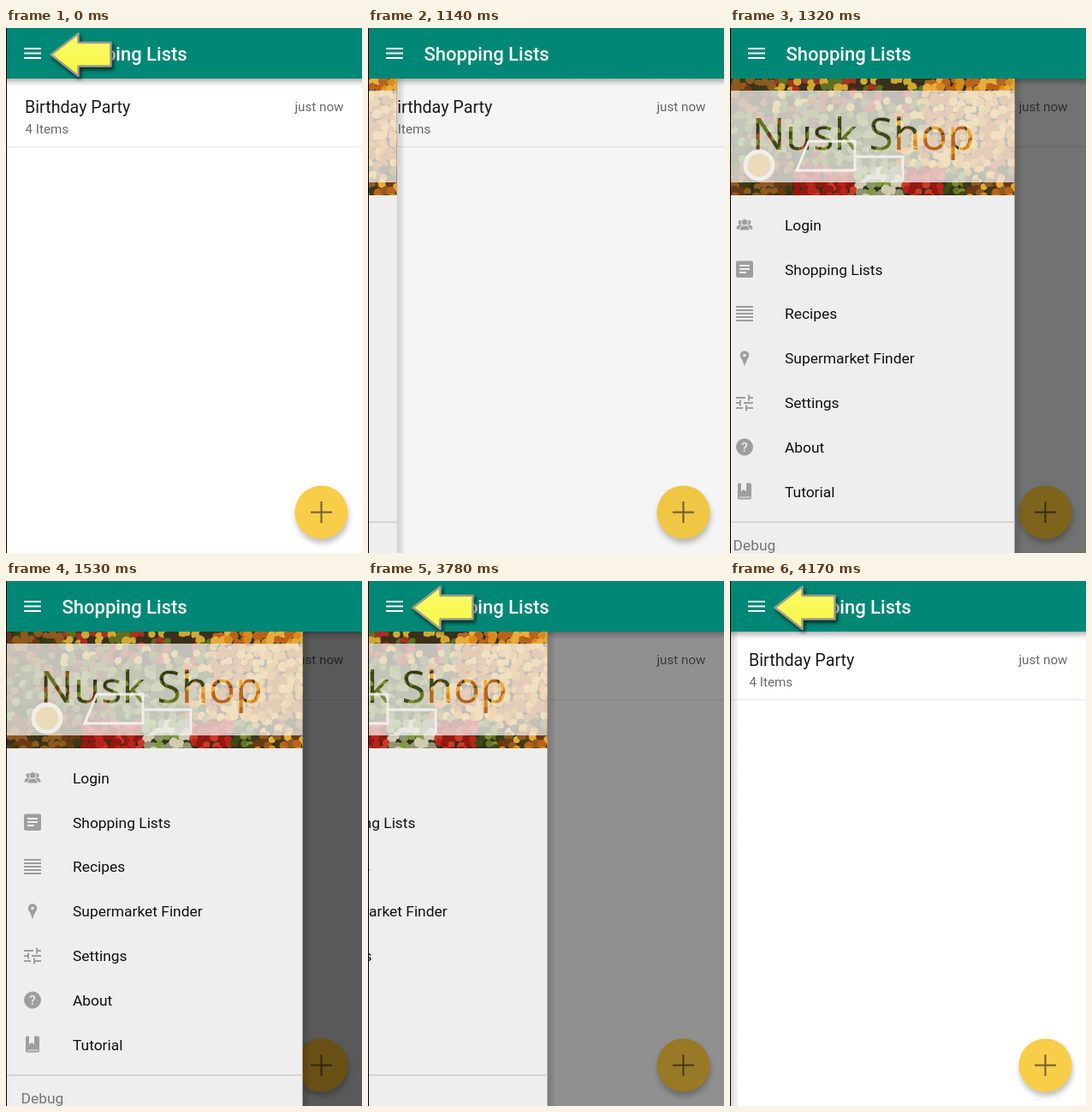
Recreate the animation shown at these times as an HTML page. Size 416x612 px, loop 4.2 s.

```html
<!DOCTYPE html>
<html lang="en">
<head>
<meta charset="utf-8">
<title>Shopping Lists</title>
<style>
html, body { margin: 0; width: 100%; height: 100%; overflow: hidden; background: #fff; }
svg { display: block; width: 416px; height: 612px; font-family: Roboto, sans-serif; }
.logo { font: 52px "Open Sans", sans-serif; }
.item { font-size: 17.4px; fill: #111; }
.small { font-size: 15.2px; fill: #6a6a6a; }
.line { fill: none; stroke: #9e9e9e; stroke-width: 2; }
#fab { filter: drop-shadow(1px 5px 3px rgba(0,0,0,.25)); }
#arrow { filter: drop-shadow(2px 3px 2px rgba(0,0,0,.7)); }
</style>
</head>
<body>
<svg viewBox="0 0 416 612">
  <defs>
    <linearGradient id="barShade" x2="0" y2="1">
      <stop stop-color="#000" stop-opacity=".28"/>
      <stop offset=".5" stop-color="#000" stop-opacity=".12"/>
      <stop offset="1" stop-color="#000" stop-opacity="0"/>
    </linearGradient>
    <linearGradient id="sideShade">
      <stop stop-color="#000" stop-opacity=".16"/>
      <stop offset="1" stop-color="#000" stop-opacity=".04"/>
    </linearGradient>
    <linearGradient id="gold" x2="0" y2="1">
      <stop stop-color="#fbfb6a"/>
      <stop offset="1" stop-color="#f6f645"/>
    </linearGradient>
    <clipPath id="photoClip"><rect x="1" y="59" width="345.5" height="136"/></clipPath>
    <mask id="cut" maskUnits="userSpaceOnUse" x="0" y="60" width="347" height="135">
      <rect y="60" width="347" height="135" fill="#fff"/>
      <text class="logo" x="300" y="142" text-anchor="end">Nusk Shop</text>
    </mask>
  </defs>

  <rect width="416" height="612" fill="#fff"/>
  <text x="22" y="98.5" font-size="19.7" fill="#1c1c1c">Birthday Party</text>
  <text class="small" x="22.5" y="123">4 Items</text>
  <text class="small" x="394.5" y="97" text-anchor="end">just now</text>
  <rect y="138" width="416" height="1" fill="#e6e6e6"/>
  <rect y="59" width="416" height="9" fill="url(#barShade)"/>
  <rect id="scrim" y="59" width="416" height="553"/>

  <g id="fab">
    <circle id="disc" cx="368.5" cy="564.5" r="31"/>
    <path id="plus" d="M356 564.5h25M368.5 552v25" stroke-width="2"/>
  </g>

  <g id="drawer">
    <rect x="346.5" y="59" width="8.5" height="553" fill="url(#sideShade)"/>
    <rect x="1" y="59" width="345.5" height="553" fill="#eee"/>
    <g id="photo" clip-path="url(#photoClip)">
      <rect y="59" width="347" height="136" fill="#33301a"/>
    </g>
    <rect x="1" y="73" width="345.5" height="107" fill="#f4f4f4" opacity=".73" mask="url(#cut)"/>
    <g id="menu"></g>
    <g fill="#9e9e9e" transform="translate(0 -.5)">
      <circle cx="26" cy="227" r="2.5"/><circle cx="36" cy="227" r="2.5"/>
      <path d="M21.5 235q0-5 4.500-5h10q4.500 0 4.500 5z"/>
      <g stroke="#eee"><circle cx="31" cy="227" r="4"/><path d="M25 236.500q0-6 6-6t6 6z"/></g>
      <rect x="21" y="272" width="20" height="19.500" rx="2"/>
      <path class="line" style="stroke:#eee" d="M25 277.500h12M25 281.500h12M25 285.500h8"/>
      <path class="line" d="M21 325.500h20M21 329.500h20M21 333.500h20M21 337.500h20M21 341.500h20"/>
      <circle cx="31" cy="382" r="5.200"/>
      <path d="M27 384.500L31 394.500L35 384.500Z"/>
      <circle cx="31" cy="382" r="1.800" fill="#eee"/>
      <path class="line" d="M21 431.500h11M36 431.500h5M36 428v7M21 437.500h5M30 437.500h11M26 434v7M21 443.500h8M33 443.500h8M33 440v7"/>
      <circle cx="31" cy="489" r="10"/>
      <text x="31" y="494.500" font-size="15.500" font-weight="500" text-anchor="middle" fill="#eee">?</text>
      <path d="M25 531h2v10l3-2.500 3 2.500v-10h4q2 0 2 2v15q0 2-2 2h-12q-2 0-2-2v-15q0-2 2-2z"/>
      <path stroke="#eee" d="M25 547.500h13"/>
    </g>
    <rect x="1" y="575" width="345.5" height="2" fill="#d6d6d6"/>
    <text class="item" x="17.500" y="608.500" style="fill:#757575">Debug</text>
  </g>

  <rect width="416" height="59" fill="#008775"/>
  <path d="M21 24h20M21 29.500h20M21 35h20" stroke="#fff" stroke-width="2"/>
  <text x="65.500" y="38" font-size="22" font-weight="500" fill="#fff">Shopping Lists</text>
  <path id="arrow" d="M52.500 31L84.500 6.500V17H122.500V44.500H84.500V56Z" fill="url(#gold)" stroke="#9c9c8c" stroke-width="2.500" stroke-linejoin="round"/>
  <rect width="1" height="612"/>
</svg>
<script>
const $ = id => document.getElementById(id);
const clamp = v => Math.min(1, Math.max(0, v));

function add(parent, tag, attrs, text = '') {
  const el = document.createElementNS('http://www.w3.org/2000/svg', tag);
  for (const k in attrs) el.setAttribute(k, attrs[k]);
  el.textContent = text;
  parent.append(el);
}

['Login', 'Shopping Lists', 'Recipes', 'Supermarket Finder', 'Settings', 'About', 'Tutorial']
  .forEach((name, i) => add($('menu'), 'text', { class: 'item', x: 78, y: 235.6 + 51.9 * i }, name));

// Market stall: rough dots of fruit, coloured by area
const reds = ['#b8241a', '#94180f', '#cc3a28'];
const greens = ['#66751e', '#3c4a14', '#7d8c34'];
const oranges = ['#d98a1c', '#e8ac3a', '#b8641a'];
const browns = ['#6b3a14', '#8f5a1d', '#3c3a14'];
const mixed = ['#d0a830', '#a83020', '#5f6e20', '#3c3018'];
const pale = ['#cfcab0', '#7d9a3c', '#8f9470'];

function palette(x, y) {
  if (y > 160) return x < 90 ? browns : x < 155 ? reds : x < 215 ? pale
    : x < 265 ? reds : x < 290 ? greens : [...browns, ...oranges];
  if (x > 240) return oranges;
  if (y < 95) return x < 60 ? browns : mixed;
  return x < 130 ? [...browns, ...greens] : x < 210 ? greens : [...greens, ...oranges];
}

let seed = 7;
const rand = () => (seed = seed * 16807 % 2147483647) / 2147483647;
for (let y = 60; y < 198; y += 8)
  for (let x = 2; x < 350; x += 8) {
    const colors = palette(x, y);
    add($('photo'), 'circle', {
      cx: (x + rand() * 5).toFixed(1), cy: (y + rand() * 5).toFixed(1),
      r: (4 + rand() * 2).toFixed(1), fill: colors[Math.floor(rand() * colors.length)]
    });
  }
add($('photo'), 'circle', { cx: 48, cy: 160, r: 16, fill: '#d09a20', stroke: '#e8e0c8', 'stroke-width': 5 });
add($('photo'), 'path', {
  d: 'M92 166L106 132H160V166ZM160 150H216V178', fill: 'none', stroke: '#e4e4dc', 'stroke-width': 3
});

const mix = (a, b, k) => `rgb(${a.map((v, i) => Math.round(v + (b[i] - v) * k))})`;

function draw(now) {
  const t = Math.floor(now % 4200 / 30) * 30;
  const opening = clamp((t - 1132) / 400);
  const closing = t < 3780 ? 0 : clamp((t - 3737) / 450);
  const slide = closing ? (1 - closing) ** 5 : 1 - (1 - opening) ** 5;
  const dim = closing ? (1 - closing) ** 4 : 1 - (1 - opening) ** 3;
  const moved = opening > 0 && closing < 1;

  $('drawer').setAttribute('transform', `translate(${Math.round(346 * (slide - 1))})`);
  $('drawer').setAttribute('visibility', moved ? 'visible' : 'hidden');
  $('scrim').setAttribute('opacity', 0.65 * dim);
  $('disc').setAttribute('fill', mix([248, 205, 72], [104, 80, 20], dim));
  $('plus').setAttribute('stroke', mix([110, 94, 50], [44, 38, 18], dim));
  $('arrow').setAttribute('opacity', t < 930 ? 1 : t < 3000 ? clamp((1050 - t) / 160) : clamp((t - 3338) / 142));
}

const start = performance.now();
function tick() {
  draw(performance.now() - start);
  requestAnimationFrame(tick);
}
tick();
</script>
</body>
</html>
```
